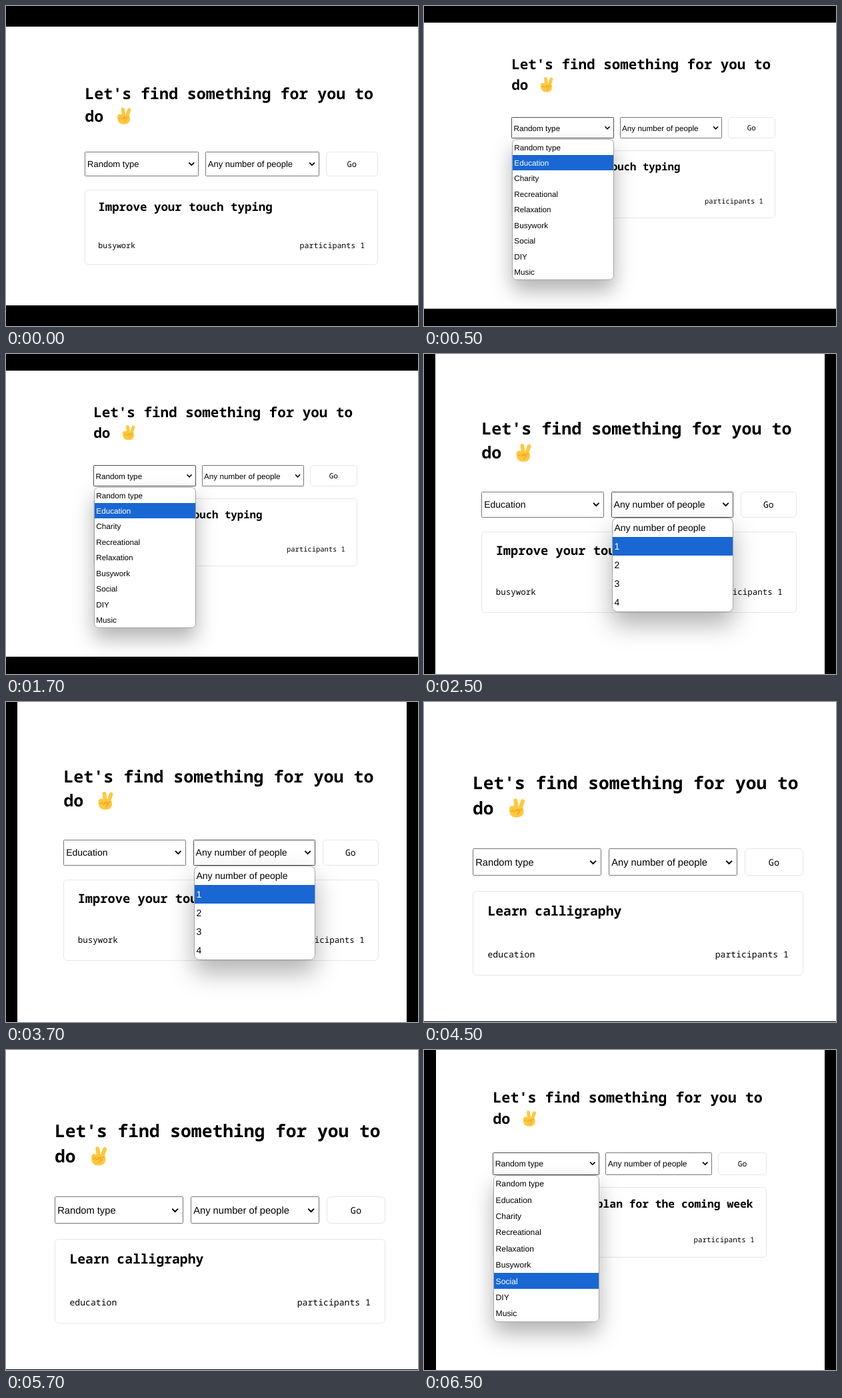
An HTML page that plays this animation: 618 px wide and 481 px high, repeating every 8 s.

```html
<!DOCTYPE html>
<html lang="en">
<head>
<meta charset="utf-8">
<title>Something to do</title>
<style>
  html, body { margin: 0; width: 100%; height: 100%; overflow: hidden; background: #fff; }
  #strip { width: 618px; animation: cut 8s step-end infinite; }
  @keyframes cut {
    0% { transform: translateY(0); }
    6.25% { transform: translateY(-481px); }
    31.25% { transform: translateY(-962px); }
    56.25% { transform: translateY(-1443px); }
    81.25%, 100% { transform: translateY(-1924px); }
  }
  svg { display: block; width: 618px; height: 481px; overflow: hidden; background: #fff; }
  text { fill: #000; text-rendering: geometricPrecision; white-space: pre; }
  .mono { font-family: "Noto Sans Mono", "DejaVu Sans Mono", monospace; }
  .bold { font-weight: 700; }
  .sans { font-family: "Liberation Sans", Arial, sans-serif; }
</style>
</head>
<body>
<div id="strip"></div>
<script>
const TYPES = ["Random type", "Education", "Charity", "Recreational", "Relaxation",
  "Busywork", "Social", "DIY", "Music"];
const PEOPLE = ["Any number of people", "1", "2", "3", "4"];
const SELECT_X = [0, 204], SELECT_W = 193, ROW = 29.45, MENU_Y = 42.4;

// x, y: top left corner of the first select; s: zoom of the page
const scenes = [
  { x: 118.3, y: 219.3, s: .886, type: 0, title: "Improve your touch typing", kind: "busywork",
    bars: [[0, 0, 618, 31], [0, 450, 618, 31]] },
  { x: 131.2, y: 166.8, s: .7966, type: 0, title: "Improve your touch typing", kind: "busywork",
    menu: 0, pick: 1, bars: [[0, 0, 618, 25], [0, 455, 618, 26]] },
  { x: 86.2, y: 206.6, s: .9527, type: 1, title: "Improve your touch typing", kind: "busywork",
    menu: 1, pick: 1, bars: [[0, 0, 17, 481], [601, 0, 17, 481]] },
  { x: 73, y: 220.4, s: 1, type: 0, title: "Learn calligraphy", kind: "education",
    bars: [[0, 480, 618, 1]] },
  { x: 103.3, y: 153.6, s: .828, type: 0, title: "Create a meal plan for the coming week",
    kind: "busywork", menu: 0, pick: 6, bars: [[0, 0, 18, 481], [601, 0, 17, 481]] }
];

const hand = `
  <g fill="none" stroke="#ffc83d" stroke-width="6" stroke-linecap="round">
    <path d="M10.3 3.4 12 16M21 4.4 17 16"/>
  </g>
  <path fill="#ffc83d" d="M3.5 11.5Q.8 12.6 1.1 17.5Q1.4 28.6 11 28.6H13Q21.4 28.6 22.6 20L21.5 14.5 14 12Z"/>
  <g fill="none" stroke="#e8a024" stroke-width="1.1" stroke-linecap="round">
    <path d="M3.4 18.6Q6.4 19.6 7.4 16.4M8 19.8Q11.2 20 11.4 17L20 16.6"/>
    <path d="M11.6 18.4Q18 18.4 17 20.4Q13.6 21 13.2 25"/>
  </g>`;

function draw(scene, id) {
  const { x, y, s } = scene;
  const px = v => Math.round(x + v * s);
  const py = v => Math.round(y + v * s);

  const text = (tx, ty, size, cls, str, more = "") =>
    `<text x="${x + tx * s}" y="${y + ty * s}" font-size="${size * s}" class="${cls}" ${more}>${str}</text>`;

  const box = (bx, by, w, h, r, stroke, more = "") => {
    const l = px(bx), t = py(by);
    return `<rect x="${l + .5}" y="${t + .5}" width="${px(bx + w) - l - 1}" height="${py(by + h) - t - 1}"
      rx="${r * s}" fill="#fff" stroke="${stroke}" ${more}/>`;
  };

  const select = (i, label) => {
    const sx = SELECT_X[i];
    return box(sx, 0, SELECT_W, 41, 1, scene.menu === i ? "#4c4c4c" : "#767676") +
      text(sx + 4.2, 26, 14.7, "sans", label) +
      `<path transform="translate(${x + (sx + 180.6) * s} ${y + 20.4 * s}) scale(${s})"
        d="M-4.4-2.2 0 2.2 4.4-2.2" fill="none" stroke="#000" stroke-width="2"/>`;
  };

  const menu = () => {
    const list = scene.menu ? PEOPLE : TYPES;
    const mx = SELECT_X[scene.menu] + 1, w = SELECT_W - 1;
    const top = MENU_Y + scene.pick * ROW;
    const l = px(mx) + 1, t = py(top);
    const rows = list.map((label, i) =>
      text(mx + 4.2, MENU_Y + i * ROW + 20, 14.7, "sans", label,
        i === scene.pick ? 'style="fill:#fff"' : "")).join("");
    return `<filter id="shade${id}" x="-60%" y="-60%" width="220%" height="220%">
        <feDropShadow dx="0" dy="${20 * s}" stdDeviation="${19 * s}" flood-opacity=".3"/>
      </filter>` +
      box(mx, 41.6, w, list.length * ROW + 1.4, 8, "#a4a4a4", `filter="url(#shade${id})"`) +
      `<rect x="${l}" y="${t}" width="${px(mx + w) - l - 1}" height="${py(top + ROW) - t}" fill="#1967d2"/>` +
      rows;
  };

  return `<svg viewBox="0 0 618 481">` +
    text(0, -89.6, 26.27, "mono bold", "Let's find something for you to") +
    text(0, -51.6, 26.27, "mono bold", "do") +
    `<g transform="translate(${x + 54 * s} ${y - 75.6 * s}) scale(${s})">${hand}</g>` +
    select(0, TYPES[scene.type]) +
    select(1, PEOPLE[0]) +
    box(408, 0, 88.4, 41, 5.5, "#e6e6e6") +
    text(452, 25.4, 13.7, "mono", "Go", 'text-anchor="middle"') +
    box(0, 63.5, 496.4, 127.5, 5.5, "#e6e6e6") +
    text(22.5, 100.6, 19.7, "mono bold", scene.title) +
    text(22.5, 163.4, 13.13, "mono", scene.kind) +
    text(474, 163.4, 13.13, "mono", "participants 1", 'text-anchor="end"') +
    (scene.menu === undefined ? "" : menu()) +
    scene.bars.map(([bx, by, w, h]) => `<rect x="${bx}" y="${by}" width="${w}" height="${h}"/>`).join("") +
    `</svg>`;
}

document.getElementById("strip").innerHTML = scenes.map(draw).join("");
</script>
</body>
</html>
```
